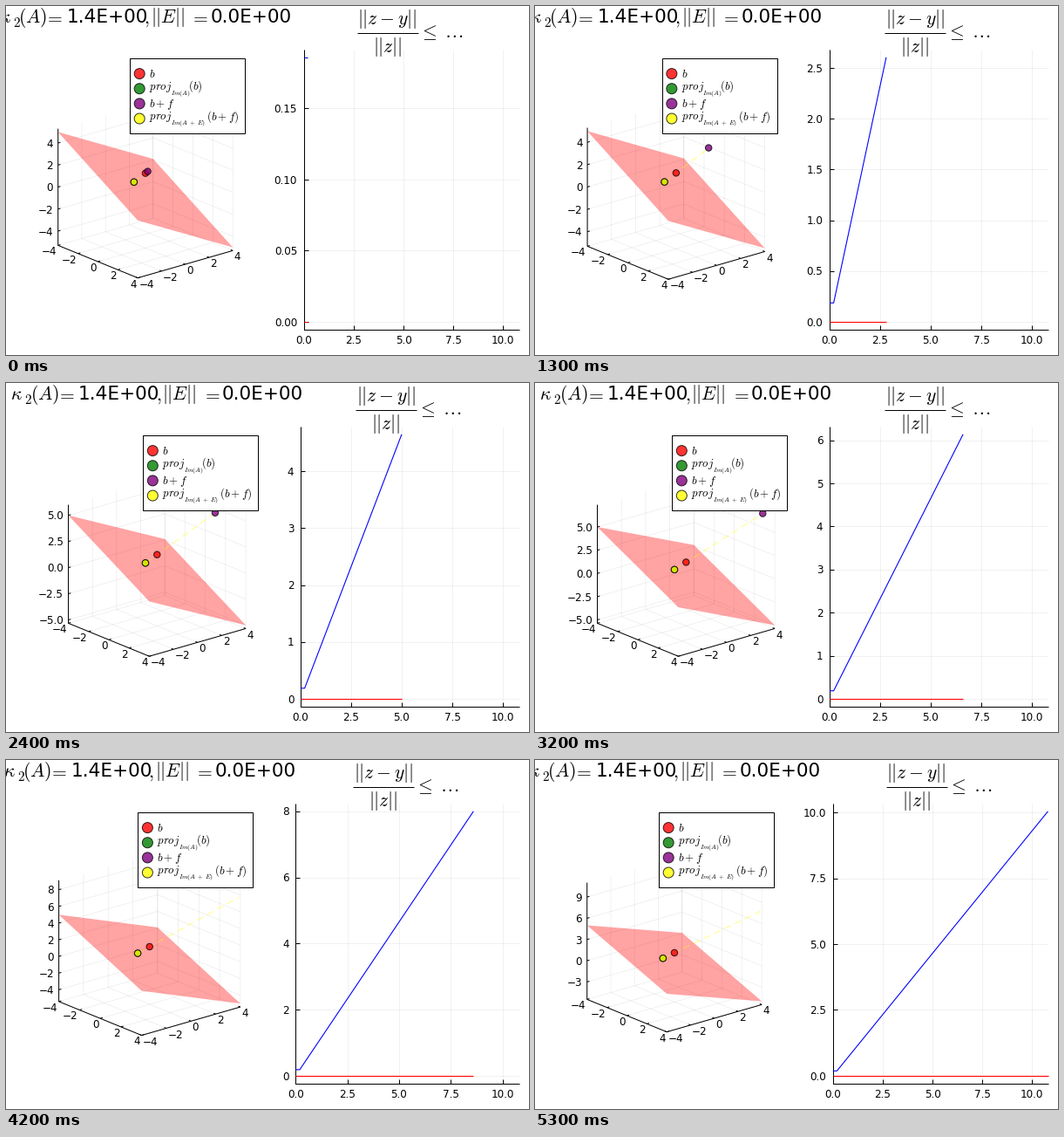
Animation of 600x400 px, one loop 5.4 s. Source, as a matplotlib script:

```python
import math

import numpy as np
import matplotlib.pyplot as plt
from matplotlib.animation import FuncAnimation
from matplotlib.patches import Circle, Polygon, Rectangle

plt.rcParams["font.family"] = "DejaVu Sans"
plt.rcParams["mathtext.fontset"] = "cm"

W, H, FRAMES = 600, 400, 54
PX = 0.72                       # points per pixel at 100 dpi
TICK_EM, TITLE_EM, LEGEND_EM, SUB_EM = 12.0, 21.6, 13.0, 7.5
TOP, BOTTOM, RIGHT = 49.7, 371.05, 588.5
T_MAX, SLOPE = 10.8, 0.93

# Plane through 0 with normal N, point B above it, shift f = t * C * N
N = np.array([0.635, 0.615, 1.0])
B = np.array([0, 0, 1.495])
C = B[2] / N.dot(N)
FOOT = B - C * N
AZ, EL = math.radians(40), math.radians(20)

fig = plt.figure(figsize=(6, 4), dpi=100, facecolor="white")
ax = fig.add_axes([0, 0, 1, 1])


def line(pts, color="black", lw=1.0, z=3, **kw):
    xs, ys = zip(*pts)
    ax.plot(xs, ys, color=color, lw=lw * PX, zorder=z,
            solid_capstyle="butt", **kw)


def grid(pts):
    line(pts, lw=0.7, z=1, alpha=0.08)


def text(x, y, s, em, ha="left", va="baseline"):
    ax.text(x, y, s, fontsize=em * PX, ha=ha, va=va, zorder=8)


def tick_label(x, y, s, ha):
    text(x, y - 0.9, s, TICK_EM, ha, "center_baseline")


def dot(x, y, r, color, z):
    ax.add_patch(Circle((x, y), r, fc=color, ec="black", lw=PX, alpha=0.8, zorder=z))


def nice_ticks(lo, hi):
    """Best scored set of 4 to 8 round ticks, with their labels."""
    span, best = hi - lo, None
    for q, nice in ((1, 1), (5, 0.9), (2, 0.7), (2.5, 0.5), (3, 0.2)):
        for e in range(-3, 2):
            step = q * 10.0 ** e
            first = math.ceil(lo / step - 1e-9)
            last = math.floor(hi / step + 1e-9)
            n = last - first + 1
            if not 4 <= n <= 8:
                continue
            score = (0.25 * (1 - abs(n - 5) / 5) + (first <= 0 <= last) / 6
                     + 0.5 * span / ((n - 1) * step) + 0.25 * nice)
            key = (round(score, 9), -n)
            if best is None or key > best[0]:
                digits = max(0, -e + (q == 2.5))
                best = key, step * np.arange(first, last + 1), digits
    ticks, digits = best[1:]
    labels = [f"{v + 0.0:.{digits}f}".replace("-", "\u2212") for v in ticks]
    return ticks, labels


def label_width(labels):
    size = {".": 0.318, "\u2212": 0.838}
    return max(sum(size.get(ch, 0.636) for ch in s) for s in labels)


def draw_space(cx, w, t, zlo, zhi, zticks, zlabels):
    side, cy = 0.5768 * w, 210.5

    def at(x, y, z):
        u, v, h = x / 8, y / 8, (z - (zlo + zhi) / 2) / (zhi - zlo)
        return (cx + side * (u * math.sin(AZ) + v * math.cos(AZ)),
                cy + side * (math.sin(EL) * (u * math.cos(AZ) - v * math.sin(AZ))
                             - math.cos(EL) * h))

    for v in (-4, -2, 0, 2, 4):
        s = str(v).replace("-", "\u2212")
        grid([at(v, -4, zlo), at(v, 4, zlo), at(v, 4, zhi)])
        grid([at(4, v, zlo), at(-4, v, zlo), at(-4, v, zhi)])
        line([at(v, -4, zlo), at(v, -3.8, zlo)])
        line([at(4, v, zlo), at(3.8, v, zlo)])
        x, y = at(v, -4, zlo)
        tick_label(x - 1.5, y + 6.8, s, "right")
        x, y = at(4, v, zlo)
        tick_label(x + 1.5, y + 7, s, "left")
    for v, s in zip(zticks, zlabels):
        grid([at(-4, -4, v), at(-4, 4, v), at(4, 4, v)])
        line([at(-4, -4, v), at(-4, -3.8, v)])
        x, y = at(-4, -4, v)
        tick_label(x - 5.5, y + 0.7, s, "right")
    line([at(-4, -4, zhi), at(-4, -4, zlo), at(4, -4, zlo), at(4, 4, zlo)])

    corners = [at(x, y, -N[0] * x - N[1] * y)
               for x, y in ((-4, -4), (4, -4), (4, 4), (-4, 4))]
    ax.add_patch(Polygon(corners, fc="red", ec="none", alpha=0.36, zorder=4))

    end = B + min(t, 4 / (C * N[0])) * C * N
    line([at(*FOOT), at(*end)], "yellow", 1, 5, alpha=0.5,
         dashes=(8, 5), dash_capstyle="butt")
    moved = B + t * C * N
    shown = [(B, "red"), (FOOT, "green"), (moved, "purple"), (FOOT, "yellow")]
    for i, (p, color) in enumerate(shown):
        if p[0] <= 4:
            dot(*at(*p), 3.7, color, 5.1 + i / 10)


def draw_legend(right):
    left = right - 132
    ax.add_patch(Rectangle((left, 60.4), 132, 85.8, fc="white", ec="black",
                           lw=PX, zorder=6))
    for i, color in enumerate(("red", "green", "purple", "yellow")):
        dot(left + 11, 77.6 + 17.15 * i, 6, color, 7)
    text(left + 22, 81.7, "$b$", LEGEND_EM)
    text(left + 22, 115.8, "$b+f$", LEGEND_EM)
    for base, sub, tail, dx in ((96, "Im(A)", "(b)", 66.5),
                                (130.2, r"Im(A\;+\;E)", "(b+f)", 87.5)):
        text(left + 22, base, "$proj$", LEGEND_EM)
        text(left + 46.5, base + 6, f"${sub}$", SUB_EM)
        text(left + dx, base, f"${tail}$", LEGEND_EM)


def draw_left_title(cx):
    pieces = [(-168, r"$\kappa$"), (-145.5, "$(A)$"), (-115.7, "$=$"),
              (-90.5, "1.4E+00"), (-1.5, "$,$"), (5.8, "$||E||$"),
              (51.2, "$=$"), (74.5, "0.0E+00")]
    for dx, s in pieces:
        text(cx + dx, 19.3, s, TITLE_EM)
    text(cx - 152, 23.5, "$2$", 0.7 * TITLE_EM)


def draw_right_title(cx):
    text(cx - 27.5, 21.3, "$||z-y||$", TITLE_EM, "center")
    line([(cx - 62.5, 31.2), (cx + 8, 31.2)])
    text(cx - 27.5, 52.5, "$||z||$", TITLE_EM, "center")
    text(cx + 9, 36, r"$\leq$", TITLE_EM)
    text(cx + 37.5, 36, r"$\ldots$", TITLE_EM)


def draw_chart(left, t, lo, hi, yticks, ylabels):
    def at(x, y):
        return (left + (RIGHT - left) * x / T_MAX,
                BOTTOM - (BOTTOM - TOP) * (y - lo) / (hi - lo))

    for v, s in zip(*nice_ticks(0, T_MAX)):
        x = at(v, 0)[0]
        grid([(x, TOP), (x, BOTTOM)])
        line([(x, BOTTOM), (x, BOTTOM - 5)])
        tick_label(x, 383.3, s, "center")
    for v, s in zip(yticks, ylabels):
        y = at(0, v)[1]
        grid([(left, y), (RIGHT, y)])
        line([(left, y), (left + 5, y)])
        tick_label(left - 7.7, y + 0.5, s, "right")
    line([(left, TOP), (left, BOTTOM), (RIGHT, BOTTOM)])
    line([at(0, 0.2 * SLOPE), at(0.2, 0.2 * SLOPE), at(t, SLOPE * t)], "blue", 1.1, 4)
    line([at(0, 0), at(t, 0)], "red", 1.1, 4)


def widen(lo, hi):
    pad = 0.03 * (hi - lo)
    return lo - pad, hi + pad


def draw(k):
    ax.clear()
    ax.set_axis_off()
    ax.set(xlim=(0, W), ylim=(H, 0))

    t = 0.2 * (k + 1)
    zlim = widen(-5, max(5, B[2] + t * C))
    ylim = widen(0, SLOPE * t)
    zticks, ylabels = nice_ticks(*zlim), nice_ticks(*ylim)

    # Both panels share one width; wide tick labels eat into it
    extra_l = TICK_EM * (label_width(zticks[1]) - 1.474)
    extra_r = TICK_EM * (label_width(ylabels[1]) - 2.226)
    w = 246.7 - (extra_l + extra_r) / 2
    x0 = 36.6 + extra_l
    cx = x0 + w / 2

    draw_space(cx, w, t, *zlim, *zticks)
    draw_legend(x0 + 0.965 * w - 0.5)
    draw_left_title(cx)
    draw_chart(RIGHT - w, t, *ylim, *ylabels)
    draw_right_title(RIGHT - w / 2)
    return []


anim = FuncAnimation(fig, draw, frames=FRAMES, interval=100,
                     init_func=lambda: [], repeat=True, repeat_delay=0)
plt.show()
```
